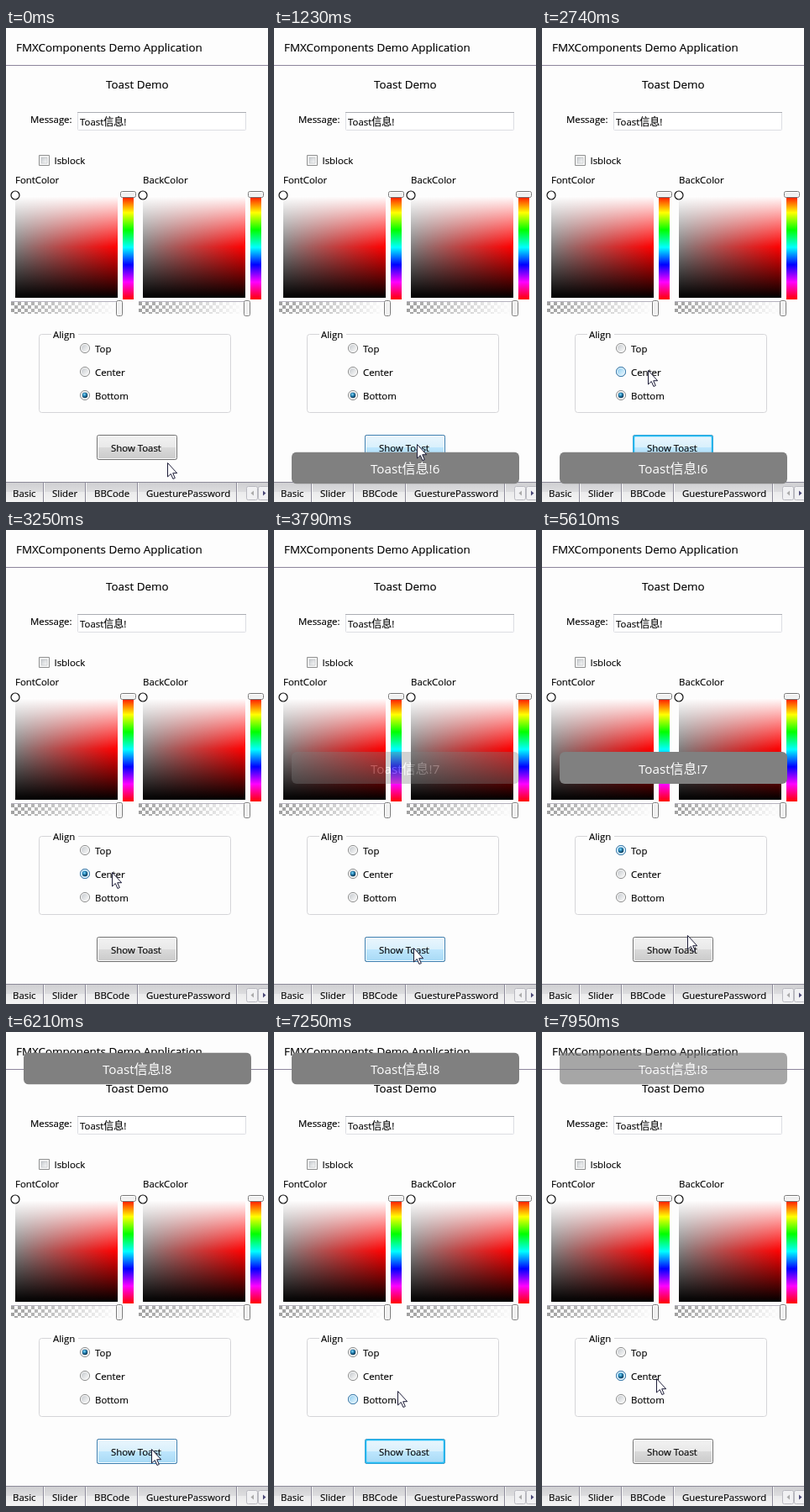
An HTML page that plays this animation: 312 px wide and 564 px high, repeating every 8000 ms.

```html
<!DOCTYPE html>
<html lang="en">
<head>
<meta charset="utf-8">
<title>Toast Demo</title>
<style>
html, body { margin: 0; width: 100%; height: 100%; overflow: hidden; background: #fdfdfd; }
svg { display: block; width: 312px; height: 564px; }
text { font: 11.4px "Open Sans", "Noto Sans", "Noto Sans CJK SC", sans-serif; fill: #000; stroke: #000; stroke-width: .15px; white-space: pre; }
.big { font-size: 13.42px; }
.cjk { font-family: "Noto Sans CJK SC", "Noto Sans CJK", sans-serif; font-size: 12px; }
.toast text { font-size: 15.2px; fill: #fff; stroke: none; }
.toast .cjk { font-size: 16px; }

/* One loop is 8000 ms, so 1% is 80 ms; every change is a hard step. */
.toast, .state, #cursor { animation: 8s step-end infinite; }
.toast, .state { opacity: 0; }

#cursor { animation-name: cursor; }
@keyframes cursor {
  0% { transform: translate(193px, 518px); }
  3.125% { transform: translate(187px, 510px); }
  4.625% { transform: translate(176px, 500px); }
  6.125% { transform: translate(171px, 496px); }
  29% { transform: translate(147px, 478px); }
  30.875% { transform: translate(128px, 431px); }
  32.75% { transform: translate(127px, 416px); }
  34.25% { transform: translate(127px, 408px); }
  42.5% { transform: translate(135px, 430px); }
  44% { transform: translate(151px, 470px); }
  45.5% { transform: translate(166px, 497px); }
  47.375% { transform: translate(167px, 498px); }
  50.75% { transform: translate(165px, 490px); }
  52.25% { transform: translate(156px, 461px); }
  53.75% { transform: translate(146px, 431px); }
  55.625% { transform: translate(128px, 404px); }
  57.125% { transform: translate(118px, 381px); }
  59% { transform: translate(115px, 380px); }
  68.25% { transform: translate(167px, 463px); }
  70.125% { transform: translate(174px, 483px); }
  72% { transform: translate(174px, 496px); }
  73.875% { transform: translate(174px, 497px); }
  85.375% { transform: translate(171px, 494px); }
  87.25% { transform: translate(167px, 471px); }
  89.125% { transform: translate(158px, 447px); }
  90.625% { transform: translate(148px, 428px); }
  92.125% { transform: translate(140px, 416px); }
  94%, 100% { transform: translate(137px, 413px); }
}

#toastBottom { animation-name: toastBottom; }
@keyframes toastBottom {
  0% { opacity: 0; }
  13.5% { opacity: .5; }
  15.375% { opacity: 1; }
  36.125% { opacity: .7; }
  37.625% { opacity: .45; }
  39.125% { opacity: .2; }
  40.625%, 100% { opacity: 0; }
}
#toastCenter { animation-name: toastCenter; }
@keyframes toastCenter {
  0% { opacity: 0; }
  47.375% { opacity: .35; }
  48.875% { opacity: .8; }
  50.75% { opacity: 1; }
  72% { opacity: .7; }
  73.875% { opacity: .35; }
  75.75%, 100% { opacity: 0; }
}
#toastTop { animation-name: toastTop; }
@keyframes toastTop {
  0% { opacity: 0; }
  75.75% { opacity: .5; }
  77.625% { opacity: 1; }
  99.375%, 100% { opacity: .7; }
}

#btnHot { animation-name: btnHot; }
@keyframes btnHot {
  0% { opacity: 0; }
  4.625% { opacity: .6; }
  6.125% { opacity: 1; }
  29% { opacity: 0; }
  45.5% { opacity: .6; }
  47.375% { opacity: 1; }
  52.25% { opacity: 0; }
  72% { opacity: .5; }
  73.875% { opacity: .8; }
  75.75% { opacity: 1; }
  87.25%, 100% { opacity: 0; }
}
#btnFocus { animation-name: btnFocus; }
@keyframes btnFocus {
  0% { opacity: 0; }
  29% { opacity: 1; }
  37.625% { opacity: 0; }
  52.25% { opacity: 1; }
  62.875% { opacity: 0; }
  87.25% { opacity: 1; }
  99.375%, 100% { opacity: 0; }
}

#topHot { animation-name: topHot; }
@keyframes topHot {
  0% { opacity: 0; }
  57.125% { opacity: 1; }
  72%, 100% { opacity: 0; }
}
#centerHot { animation-name: centerHot; }
@keyframes centerHot {
  0% { opacity: 0; }
  34.25% { opacity: 1; }
  47.375% { opacity: 0; }
  55.625% { opacity: 1; }
  57.125% { opacity: 0; }
  92.125%, 100% { opacity: 1; }
}
#bottomHot { animation-name: bottomHot; }
@keyframes bottomHot {
  0% { opacity: 0; }
  30.875% { opacity: 1; }
  32.75% { opacity: 0; }
  53.75% { opacity: 1; }
  55.625% { opacity: 0; }
  90.625% { opacity: 1; }
  92.125%, 100% { opacity: 0; }
}
#topDot { animation-name: topDot; }
@keyframes topDot {
  0% { opacity: 0; }
  62.875% { opacity: 1; }
  99.375%, 100% { opacity: 0; }
}
#centerDot { animation-name: centerDot; }
@keyframes centerDot {
  0% { opacity: 0; }
  37.625% { opacity: 1; }
  62.875% { opacity: 0; }
  99.375%, 100% { opacity: 1; }
}
#bottomDot { animation-name: bottomDot; }
@keyframes bottomDot {
  0% { opacity: 1; }
  37.625%, 100% { opacity: 0; }
}
</style>
</head>
<body>
<svg viewBox="0 0 312 564">
  <defs>
    <linearGradient id="sat">
      <stop stop-color="#808080"/><stop offset="1" stop-color="#f00"/>
    </linearGradient>
    <linearGradient id="light" x2="0" y2="1">
      <stop stop-color="#fff"/><stop offset=".5" stop-color="#fff" stop-opacity="0"/>
      <stop offset=".5" stop-color="#000" stop-opacity="0"/><stop offset="1" stop-color="#000"/>
    </linearGradient>
    <linearGradient id="hue" x2="0" y2="1">
      <stop stop-color="#f00"/><stop offset=".167" stop-color="#ff0"/>
      <stop offset=".333" stop-color="#0f0"/><stop offset=".5" stop-color="#0ff"/>
      <stop offset=".667" stop-color="#00f"/><stop offset=".833" stop-color="#f0f"/>
      <stop offset="1" stop-color="#f00"/>
    </linearGradient>
    <linearGradient id="fade">
      <stop stop-color="#fdfdfd" stop-opacity="0"/><stop offset="1" stop-color="#fdfdfd"/>
    </linearGradient>
    <linearGradient id="face" x2="0" y2="1">
      <stop stop-color="#f2f2f2"/><stop offset=".5" stop-color="#e9e9e9"/>
      <stop offset=".5" stop-color="#dadada"/><stop offset="1" stop-color="#cacaca"/>
    </linearGradient>
    <linearGradient id="faceHot" x2="0" y2="1">
      <stop stop-color="#eaf6fd"/><stop offset=".5" stop-color="#d9f0fc"/>
      <stop offset=".5" stop-color="#bee6fd"/><stop offset="1" stop-color="#a7d9f5"/>
    </linearGradient>
    <linearGradient id="tab" x2="0" y2="1">
      <stop stop-color="#cfcfd2"/><stop offset=".5" stop-color="#dedee0"/>
      <stop offset=".5" stop-color="#ebebec"/><stop offset="1" stop-color="#f3f3f3"/>
    </linearGradient>
    <linearGradient id="well" x2="1" y2="1">
      <stop stop-color="#c6cace"/><stop offset="1" stop-color="#fafafa"/>
    </linearGradient>
    <linearGradient id="wellHot" x2="1" y2="1">
      <stop stop-color="#8fcdf0"/><stop offset="1" stop-color="#e6f6fe"/>
    </linearGradient>
    <radialGradient id="bead" cx=".4" cy=".35" r=".65">
      <stop stop-color="#8fe0fb"/><stop offset=".45" stop-color="#2583b5"/><stop offset="1" stop-color="#0b3350"/>
    </radialGradient>
    <pattern id="check" x="6" y="326" width="8" height="8" patternUnits="userSpaceOnUse">
      <path d="M0 0h4v8h4V4H0z" fill="#a0a0a0"/>
    </pattern>

    <g id="picker">
      <path d="M11 200h122v121H11z" fill="url(#sat)"/>
      <path d="M11 200h122v121H11z" fill="url(#light)"/>
      <circle cx="11" cy="199" r="5" fill="#fff" stroke="#111" stroke-width="1.2"/>
      <path d="M139 199h13v124h-13z" fill="url(#hue)"/>
      <rect x="136.500" y="194.500" width="18" height="7" rx="2" fill="#f0f0f0" stroke="#777"/>
      <rect x="137.500" y="195.500" width="16" height="5" rx="1" fill="none" stroke="#fff"/>
      <path d="M6 326h126v14H6z" fill="url(#check)"/>
      <path d="M6 326h118v14H6zM124 326h8v14h-8z" fill="url(#fade)"/>
      <path d="M6 325.500h126" stroke="#b5b2be"/>
      <rect x="131.500" y="324.500" width="7" height="18" rx="2" fill="#f0f0f0" stroke="#777"/>
      <rect x="132.500" y="325.500" width="5" height="16" rx="1" fill="none" stroke="#fff"/>
    </g>
    <g id="ring">
      <circle r="5.600" fill="#f8f8f8" stroke="#8e8f8f"/>
      <circle r="4" fill="url(#well)"/>
    </g>
    <g id="ringHot">
      <circle r="5.600" fill="#e4f4fd" stroke="#3c7fb1"/>
      <circle r="4" fill="url(#wellHot)"/>
    </g>
    <circle id="dot" r="3.200" fill="url(#bead)"/>
    <rect id="plate" x="21" width="271" height="38" rx="6" fill="#808080"/>
  </defs>

  <path d="M0 0h312v564H0z" fill="#fdfdfd"/>
  <path d="M0 44.500h312" stroke="#8c859c"/>
  <text class="big" x="12" y="28">FMXComponents Demo Application</text>
  <text class="big" x="119" y="72">Toast Demo</text>

  <text x="29" y="113">Message:</text>
  <rect x="85.500" y="100.500" width="200" height="21" rx="1" fill="#fff" stroke="#dcdde3"/>
  <path d="M85 100.500h201" stroke="#abadb3"/>
  <text x="88" y="116">Toast<tspan class="cjk">信息</tspan>!</text>

  <path d="M39.500 151.500h12v12h-12z" fill="#f8f8f8" stroke="#8e8f8f"/>
  <path d="M42 154h7v7h-7z" fill="url(#well)" stroke="#b5b9be" stroke-width=".6"/>
  <text x="57.500" y="162">Isblock</text>

  <text x="11" y="185">FontColor</text>
  <text x="163" y="185">BackColor</text>
  <use href="#picker"/>
  <use href="#picker" x="152"/>

  <rect x="39.500" y="364.500" width="228" height="93" rx="3" fill="none" stroke="#d5d5d8"/>
  <path d="M54 362h32v5H54z" fill="#fdfdfd"/>
  <text x="56" y="369">Align</text>
  <g transform="translate(94 381)">
    <use href="#ring"/>
    <use href="#ringHot" id="topHot" class="state"/>
    <use href="#dot" id="topDot" class="state"/>
    <text x="12" y="5">Top</text>
  </g>
  <g transform="translate(94 409)">
    <use href="#ring"/>
    <use href="#ringHot" id="centerHot" class="state"/>
    <use href="#dot" id="centerDot" class="state"/>
    <text x="12" y="5">Center</text>
  </g>
  <g transform="translate(94 437)">
    <use href="#ring"/>
    <use href="#ringHot" id="bottomHot" class="state"/>
    <use href="#dot" id="bottomDot" class="state"/>
    <text x="12" y="5">Bottom</text>
  </g>

  <g>
    <rect x="108.500" y="484.500" width="95" height="29" rx="2" fill="url(#face)" stroke="#707070"/>
    <rect x="109.500" y="485.500" width="93" height="27" rx="1.500" fill="none" stroke="#fbfbfb"/>
    <g id="btnFocus" class="state">
      <rect x="108.500" y="484.500" width="95" height="29" rx="2" fill="url(#faceHot)" stroke="#3c9fd0"/>
      <rect x="109.500" y="485.500" width="93" height="27" rx="1.500" fill="none" stroke="#1fbdf5" stroke-width="1.500"/>
    </g>
    <g id="btnHot" class="state">
      <rect x="108.500" y="484.500" width="95" height="29" rx="2" fill="url(#faceHot)" stroke="#3c7fb1"/>
      <rect x="109.500" y="485.500" width="93" height="27" rx="1.500" fill="none" stroke="#f4fbfe"/>
    </g>
    <text x="125" y="504">Show Toast</text>
  </g>

  <path d="M0 541h312v23H0z" fill="url(#tab)"/>
  <path d="M0 540.500h312M44.500 541v23M94.500 541v23M156.500 541v23M274.500 541v23" fill="none" stroke="#8c8a99"/>
  <path d="M45.500 541v23M95.500 541v23M157.500 541v23M275.500 541v23" stroke="#f8f8f8"/>
  <text x="8" y="558">Basic</text>
  <text x="55" y="558">Slider</text>
  <text x="105" y="558">BBCode</text>
  <text x="167" y="558">GuesturePassword</text>
  <text x="285.500" y="558">C</text>
  <g fill="#f1f1f3" stroke="#b9b9c0">
    <rect x="286.500" y="545.500" width="13" height="16" rx="2"/>
    <rect x="300.500" y="545.500" width="13" height="16" rx="2"/>
  </g>
  <path d="M295 550.500v6l-3.500-3z" fill="#aaa"/>
  <path d="M306 550.500v6l3.500-3z" fill="#4c4a78"/>

  <g transform="translate(0 504.500)"><g id="toastBottom" class="toast">
    <use href="#plate"/>
    <text x="115" y="25.500">Toast<tspan class="cjk">信息</tspan>!6</text>
  </g></g>
  <g transform="translate(0 264)"><g id="toastCenter" class="toast">
    <use href="#plate"/>
    <text x="115" y="26">Toast<tspan class="cjk">信息</tspan>!7</text>
  </g></g>
  <g transform="translate(0 24.500)"><g id="toastTop" class="toast">
    <use href="#plate"/>
    <text x="115" y="25.500">Toast<tspan class="cjk">信息</tspan>!8</text>
  </g></g>

  <path id="cursor" d="M-.5-.5v16.500l3.800-3.500 2.600 6 2.400-1-2.600-5.800h5z" fill="#fff" stroke="#1c1c38"/>
</svg>
</body>
</html>
```
